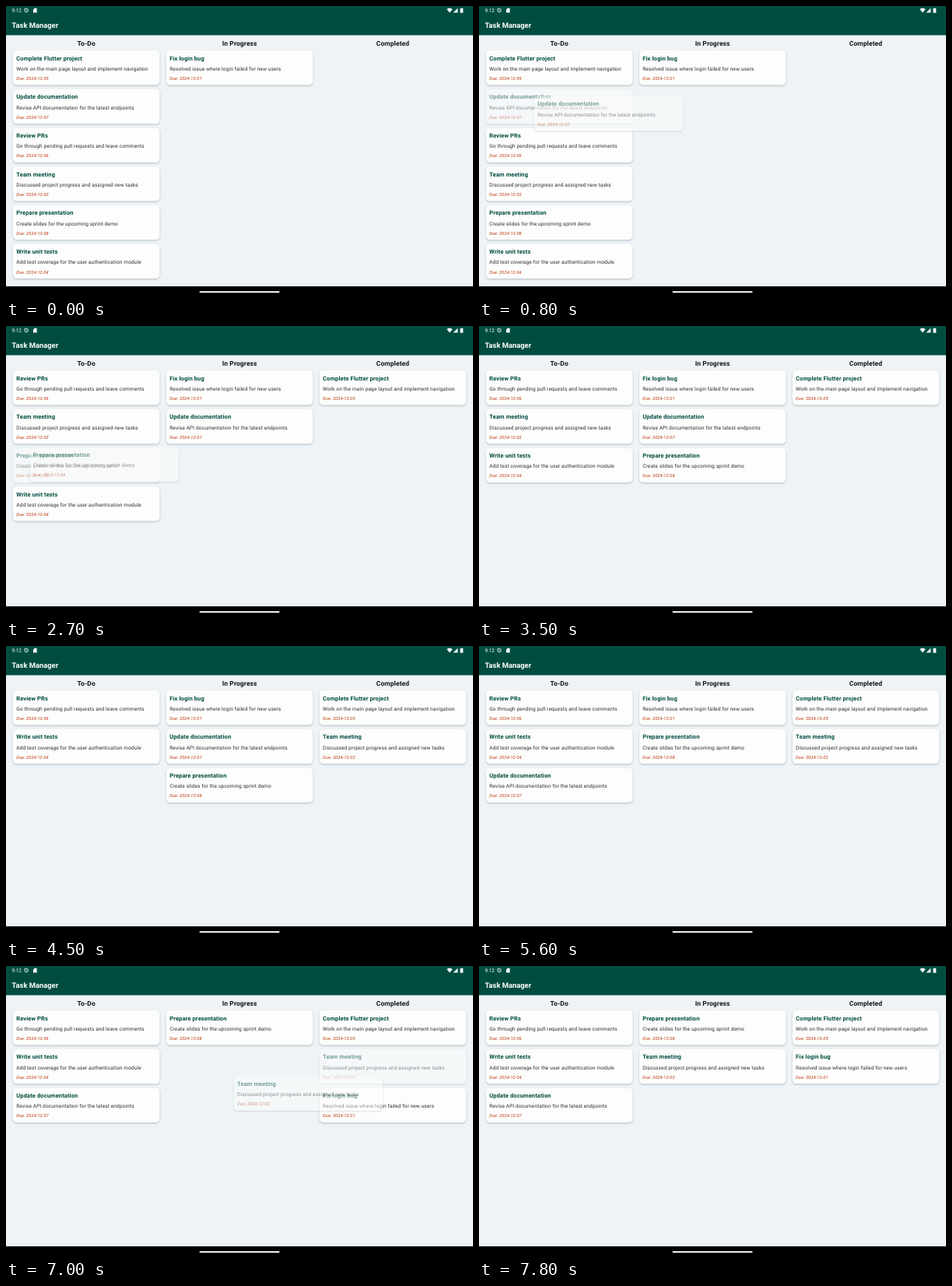
An HTML page for the animation above (8100 ms loop, 600 by 375 pixels).

```html
<!DOCTYPE html>
<html lang="en">
<head>
<meta charset="utf-8">
<title>Task Manager</title>
<style>
  html, body { margin: 0; width: 100%; height: 100%; overflow: hidden; background: #eef3f7; }
  svg { display: block; width: 600px; height: 375px; }
  text { font-family: Roboto, sans-serif; letter-spacing: .117px; text-rendering: geometricPrecision; }
  .clock { font-size: 6.56px; fill: #fff; letter-spacing: 0; }
  .app { font-size: 9.38px; font-weight: 700; fill: #fff; letter-spacing: 0; }
  .head { font-size: 8.44px; font-weight: 700; fill: #111; text-anchor: middle; }
  .name { font-size: 7.5px; font-weight: 700; fill: #004d40; }
  .desc { font-size: 6.56px; fill: #2c2c2c; }
  .due { font-size: 5.63px; font-style: italic; fill: #bf360c; }
  .card rect { fill: #fcfdfc; filter: drop-shadow(0 1.3px 1.3px rgba(0, 0, 0, .24)); }
</style>
</head>
<body>
<svg viewBox="0 0 600 375">
  <rect width="600" height="375" fill="#eef3f7"/>
  <rect width="600" height="37.5" fill="#004d40"/>
  <text class="clock" x="7.4" y="8">9:12</text>
  <g fill="none" stroke="#fff" stroke-width=".8">
    <circle cx="26" cy="5.5" r="2.4"/>
    <path d="M24.3 3.8l3.4 3.4"/>
  </g>
  <g fill="#fff">
    <path d="M36.7 2.8h2.9v5.6h-4.6v-3.9z"/>
    <path d="M566.4 4.2q3.6-2.9 7.2 0l-3.6 4.4z"/>
    <path d="M580.4 2.7v5.8h-5.8z"/>
    <path d="M584.5 2.5h1.8v.7h1v5.5h-3.8v-5.5h1z"/>
  </g>
  <text class="app" x="7.5" y="27.8">Task Manager</text>
  <g id="heads"></g>
  <g id="board"></g>
  <g id="ghosts"></g>
  <rect y="360" width="600" height="15" fill="#000"/>
  <rect x="248.5" y="366.2" width="103" height="2" rx="1" fill="#fff"/>
</svg>
<script>
const LOOP = 8100, STEP = 100;
const LEFT = 8.9, TOP = 57, COL = 196.9, ROW = 49.7;

const tasks = {
  flutter: ['Complete Flutter project', 'Work on the main page layout and implement navigation', '05'],
  docs: ['Update documentation', 'Revise API documentation for the latest endpoints', '07'],
  prs: ['Review PRs', 'Go through pending pull requests and leave comments', '06'],
  team: ['Team meeting', 'Discussed project progress and assigned new tasks', '02'],
  slides: ['Prepare presentation', 'Create slides for the upcoming sprint demo', '08'],
  tests: ['Write unit tests', 'Add test coverage for the user authentication module', '04'],
  login: ['Fix login bug', 'Resolved issue where login failed for new users', '01']
};
const start = [['flutter', 'docs', 'prs', 'team', 'slides', 'tests'], ['login'], []];

// Each drag: task, target column, then [time, dx, dy] for pick-up, passing point and drop
const drags = [
  ['docs', 1, [500, 0, 0], [800, 62, 9], [1200, 196, 14]],
  ['flutter', 2, [1300, 0, 0], [1900, 393, 4], [2100, 394, 6]],
  ['slides', 1, [2600, 0, 0], [2900, 90, -4], [3200, 194, -8]],
  ['team', 2, [3700, 0, 0], [4000, 180, 6], [4300, 388, 3]],
  ['docs', 0, [4700, 0, 0], [5000, -95, 14], [5300, -195, 36]],
  ['login', 2, [5700, 0, 0], [5900, 80, 40], [6200, 191, 96]],
  ['team', 1, [6800, 0, 0], [7000, -110, 34.5], [7300, -196, 22]]
];

const $ = id => document.getElementById(id);

function add(parent, tag, attrs, text) {
  const el = document.createElementNS('http://www.w3.org/2000/svg', tag);
  for (const key in attrs) el.setAttribute(key, attrs[key]);
  if (text) el.textContent = text;
  return parent.appendChild(el);
}

function makeCard(parent, [name, desc, day], width) {
  const card = add(parent, 'g', { class: 'card' });
  add(card, 'rect', { width, height: 44.5, rx: 5.2 });
  add(card, 'text', { class: 'name', x: 4.4, y: 12.5 }, name);
  add(card, 'text', { class: 'desc', x: 4.4, y: 25.9 }, desc);
  add(card, 'text', { class: 'due', x: 4.4, y: 38 }, 'Due: 2024-12-' + day);
  return card;
}

function place(el, x, y, opacity) {
  el.setAttribute('transform', `translate(${x} ${y})`);
  el.setAttribute('opacity', opacity);
}

['To-Do', 'In Progress', 'Completed'].forEach((label, i) =>
  add($('heads'), 'text', { class: 'head', x: 103.2 + i * COL, y: 51.1 }, label));

const cards = {}, ghosts = {};
for (const id in tasks) {
  cards[id] = makeCard($('board'), tasks[id], 188.6);
  ghosts[id] = makeCard($('ghosts'), tasks[id], 191.5);
}

function offset(t, a, b, c) {
  const early = t < b[0];
  const [p, q] = early ? [a, b] : [b, c];
  const u = (t - p[0]) / (q[0] - p[0]);
  const k = early ? u ** 1.3 : 1 - (1 - u) ** 1.3;
  return [1, 2].map(i => p[i] + (q[i] - p[i]) * k);
}

function draw(t) {
  const lists = start.map(list => [...list]);
  let active = null;
  for (const drag of drags) {
    const [id, target, from, , to] = drag;
    if (t >= to[0]) {
      const list = lists.find(l => l.includes(id));
      list.splice(list.indexOf(id), 1);
      lists[target].push(id);
    } else if (t > from[0]) active = drag;
  }
  for (const id in ghosts) ghosts[id].setAttribute('display', 'none');
  lists.forEach((list, col) => list.forEach((id, row) => {
    const x = LEFT + col * COL, y = TOP + row * ROW;
    const held = active && active[0] === id;
    place(cards[id], x, y, held ? .5 : 1);
    if (held) {
      const [dx, dy] = offset(t, ...active.slice(2));
      ghosts[id].removeAttribute('display');
      place(ghosts[id], x + dx, y + dy, .5);
    }
  }));
}

const t0 = performance.now();
let shown = -1;
function tick() {
  const t = Math.floor((performance.now() - t0) % LOOP / STEP) * STEP;
  if (t !== shown) draw(shown = t);
  requestAnimationFrame(tick);
}
tick();
</script>
</body>
</html>
```
